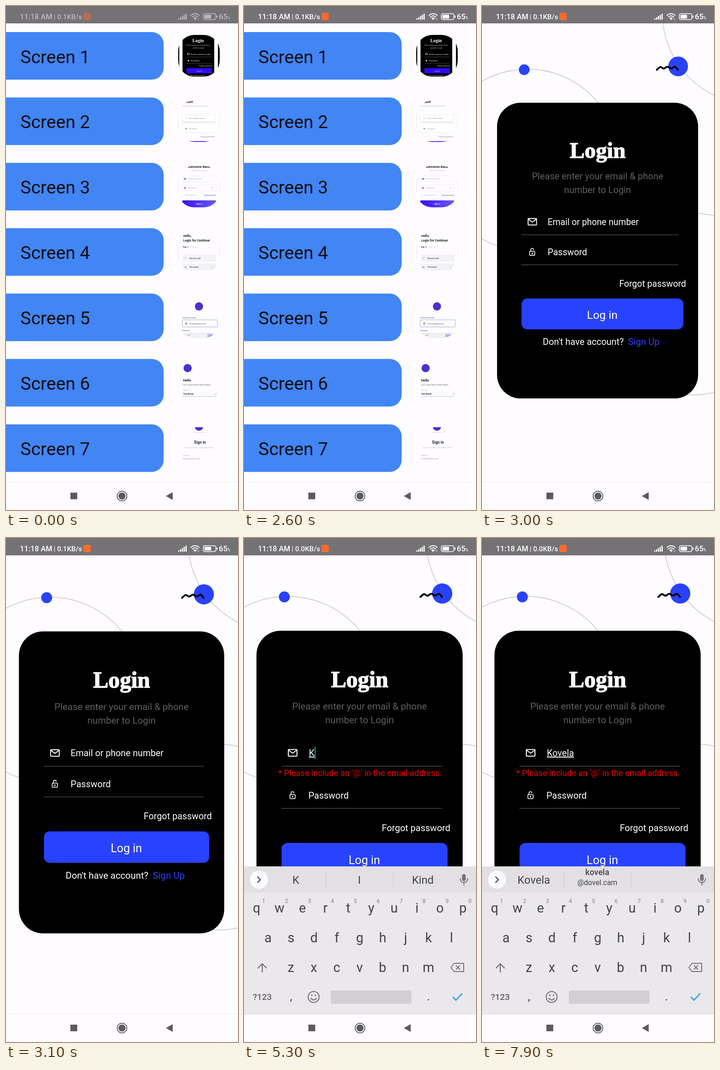
An HTML page that plays this animation: 508 by 1102 pixels, repeating every 8 s.

```html
<!DOCTYPE html>
<html lang="en">
<head>
<meta charset="utf-8">
<title>Login screens</title>
<style>
html, body { margin: 0; width: 100%; height: 100%; overflow: hidden; background: #fefcff; }
svg { display: block; width: 100vw; height: 100vh; font-family: Roboto, sans-serif; }
.mid { text-anchor: middle; }
.end { text-anchor: end; }
.b { font-weight: 700; }
.m { font-weight: 500; }
.serif { font-family: "Liberation Serif", serif; font-weight: 700; }
.line { fill: none; stroke-linecap: round; stroke-linejoin: round; }
</style>
</head>
<body>
<svg id="stage" viewBox="0 0 508 1102" preserveAspectRatio="none"></svg>
<script>
const LOOP = 8000, STEP = 100, MID = [254, 549];
const NAME = 'Kovela', MAIL = '@dovel.cam';

// Shape helpers
const text = (x, y, size, str, fill = '#222', cls = '') =>
  `<text x="${x}" y="${y}" font-size="${size}" fill="${fill}" class="${cls}">${str}</text>`;
const rect = (x, y, w, h, fill, r = 0, more = '') =>
  `<rect x="${x}" y="${y}" width="${w}" height="${h}" rx="${r}" fill="${fill}" ${more}/>`;
const disc = (x, y, r, fill) => `<circle cx="${x}" cy="${y}" r="${r}" fill="${fill}"/>`;
const ring = (x, y, r, stroke, w = 1, more = '') =>
  `<circle cx="${x}" cy="${y}" r="${r}" fill="none" stroke="${stroke}" stroke-width="${w}" ${more}/>`;
const path = (d, stroke, w = 1) => `<path class="line" d="${d}" stroke="${stroke}" stroke-width="${w}"/>`;
const group = (id, body, more = '') => `<g id="${id}" ${more}>${body}</g>`;

// Small round previews, drawn in the place of the first row
const field = (y, h, fill, edge) => rect(386.5, y, 73.5, h, fill, 2, `stroke="${edge}" stroke-width=".7"`);
const edges = rect(377, 92, .8, 34, '#e4e3e6') + rect(467.2, 92, .8, 34, '#e4e3e6');
const previews = [
  rect(376, 63, 3.4, 92, '#000') + rect(464, 63, 5, 92, '#000') + rect(386.5, 63, 69.5, 92, '#000') +
    text(420.5, 79, 10, 'Login', '#fff', 'serif mid') +
    text(421, 87, 3.6, 'Please enter your email &amp; phone', '#ccc', 'mid') +
    text(421, 93, 3.6, 'number to Login', '#ccc', 'mid') +
    rect(397.5, 103.5, 4, 3, 'none', 0, 'stroke="#fff" stroke-width=".7"') +
    text(404.5, 106.5, 4.3, 'Email or phone number', '#fff') + rect(396, 111, 54, .5, '#777') +
    rect(398, 118, 3, 3, '#ccc') + text(404.5, 121, 4.3, 'Password', '#fff') + rect(396, 125, 54, .5, '#777') +
    text(451, 132, 3.8, 'Forgot password', '#ddd', 'end') + rect(395, 136, 55.5, 11, '#3309f5', 1) +
    text(423, 143.5, 4.5, 'Log in', '#b9b0ff', 'mid') +
    text(404, 152.5, 3.6, "Don't have account?", '#ddd') + text(435, 152.5, 3.6, 'Sign Up', '#4030ff'),
  edges + text(381, 69, 7.5, 'Account', '#222', 'b') +
    text(387, 77, 3.4, 'Sign in with your account to continue', '#aaa') +
    rect(385.5, 96.5, 74, 15.5, '#ddd', 4) + rect(385, 95, 74.5, 15.5, '#fff', 4, 'stroke="#e4e4e8" stroke-width=".6"') +
    ring(394.5, 102.5, 1.3, '#aaa', .6) + text(400.5, 104.5, 3.5, 'Email or phone number', '#888') +
    rect(385, 119, 74.5, 15, '#f2f1f5', 4) + rect(385, 118, 74.5, 14.5, '#fff', 4) +
    rect(393, 123.5, 3.5, 3.5, '#aaa') + text(401, 127, 3.8, 'Password', '#888') +
    text(457.5, 144, 4, 'Forgot password?', '#777', 'end') + rect(386, 152.6, 74, 8, '#4419ee', 2),
  edges + text(422.5, 68, 7.4, 'Welcome Back', '#222', 'b mid') +
    text(423, 75, 4.2, 'Sign in to continue', '#aaa', 'mid') +
    field(85.5, 13, '#fefcff', '#eceaf0') + rect(389.5, 90, 5, 4, '#999') + text(398.5, 93.5, 4.2, 'Enter your email', '#aaa') +
    field(105, 13, '#fefcff', '#eceaf0') + rect(390, 110, 4, 4, '#999') + text(398.5, 113.2, 4.2, 'Password', '#aaa') +
    ring(452, 111.5, 1.6, '#bbb', .6) + rect(387, 126, 4, 4, 'none', 0, 'stroke="#ddd" stroke-width=".5"') +
    text(394, 129.5, 3.8, 'Remember me', '#aaa') + text(460, 129.5, 3.4, 'Forgot password?', '#3322dd', 'end') +
    rect(386, 139, 74, 16, 'url(#violet)', 1) + text(423, 148.5, 4.4, 'Sign in', '#fff', 'mid b'),
  edges + text(388, 76.5, 7, 'Hello,', '#222', 'b') + text(388, 86, 7, 'Login for Continue', '#222', 'b') +
    text(387, 99, 4.2, 'Sign in', '#333', 'b') + text(402, 99, 4.2, '/ Sign up', '#bbb') +
    rect(387, 115, 73.5, 15, '#f3f2f4', 2) + ring(393, 122, 1.3, '#999', .6) + text(402, 124.2, 4.4, 'Dorvan Lusk', '#222', 'm') +
    rect(387, 134.5, 73.5, 15, '#f3f2f4', 2) + rect(391.5, 141, 3, 3, '#999') + text(402, 143.5, 4.4, 'Password', '#222', 'm') +
    ring(452, 142, 1.5, '#bbb', .6),
  disc(422.5, 85, 9, '#4a30cf') + text(386, 111, 3.6, 'Username or Email', '#333') +
    rect(386, 114.5, 77, 15.5, '#fff', 2, 'stroke="#8c92e0" stroke-width=".8"') +
    disc(394.5, 121, 1.2, '#666') + rect(392.5, 123, 4, 1.6, '#666', .6) +
    text(402, 124, 3.8, 'fenwotte@dovel.com', '#333') + text(386, 139.5, 3.6, 'Password', '#333') +
    rect(387, 142, 73, 14, '#f0eff2', 2) + text(397, 150.5, 5, '••••', '#333') + rect(441, 145.5, 12, 7, '#b3b2ee', 1),
  disc(397.7, 77, 9, '#4a30cf') + text(387.5, 106.5, 7.6, 'Hello', '#222', 'b') +
    text(387.5, 115.5, 4.5, 'Let’s Learn More About Plants', '#777') + text(387.5, 126, 3, 'Username', '#aaa') +
    text(388, 135, 4.8, 'Tolo Brenk', '#222', 'm') + path('M456.5 133l1.6 1.7 3.4-3.8', '#69c9a2', 1) + rect(387, 138.6, 74, .9, '#a9c6c0'),
  disc(422.5, 62, 9, '#4a30cf') + rect(411, 74.5, 23, .8, '#ccc') + ring(439.5, 73, 2, '#ddd', .8) +
    text(424.5, 99, 8.4, 'Sign in', '#2b2b3b', 'b mid') +
    text(423, 109, 3.9, 'Enter to continue and explore within', '#aaa', 'mid') +
    text(388, 126.5, 3.2, 'Email line', '#999') + text(387, 133.5, 4.1, 'fenwotte@dovel.com', '#888')
];
const rows = previews.map((art, i) => `<g transform="translate(0 ${142.95 * i})">
  ${rect(-40, 57, 385.2, 104, '#4285f5', 26)}${text(31.5, 124.5, 39.4, 'Screen ' + (i + 1), '#0c0d10')}
  <g clip-path="url(#round)">${art}</g></g>`).join('');

// Login page
const lock = `${rect(100.5, 536, 11.5, 9, 'none', 1, 'stroke="#fff" stroke-width="1.6"')}
  ${path('M103 536v-3a3 3 0 0 1 6.3-.6', '#fff', 1.6)}${rect(105.2, 539, 2.4, 3.4, '#fff')}`;
const mail = rect(97, 462.5, 19, 14.5, 'none', 1, 'stroke="#fff" stroke-width="2"') + path('M97.5 464l9 6.5 9-6.5', '#fff', 2);
const login = rect(0, 38, 508, 1002, '#fefcff') +
  ring(95.6, 331.5, 204, '#d3d2d5', 2) + ring(602.5, 1.8, 204, '#d3d2d5', 2) + ring(466, 654.5, 204, '#d3d2d5', 2) +
  disc(88.3, 128.7, 12, '#2942ff') + disc(434, 121.3, 22.1, '#2942ff') +
  path('M386 129L391 124.5Q394 121 398 124.5T406 124Q410 120 414.5 124Q418 128 422.5 124Q427 120 429.5 124L433.5 129', '#000', 4) +
  rect(27.3, 202.8, 451.5, 663.2, '#000', 53) +
  `<g stroke="#fff" stroke-width="1.5">${text(253.3, 326, 50, 'Login', '#fff', 'serif mid')}</g>` +
  text(253, 375, 20.7, 'Please enter your email &amp; phone', '#5f5f5f', 'mid') +
  text(253, 405, 20.7, 'number to Login', '#5f5f5f', 'mid') +
  mail + rect(82, 498.3, 352, 1.2, '#5a5a60') +
  text(141, 477, 19.85, 'Email or phone number', '#fff').replace('<text', '<text id="hint"') +
  '<text id="typed" x="142" y="477" font-size="20" fill="#fff" text-decoration="underline"></text>' +
  '<rect id="caret" y="456.5" width="2.4" height="27" fill="#0d8c82"/>' +
  group('error', text(75, 520, 18.45, "* Please include an '@' in the email address.", '#f50000')) +
  group('lower', lock + text(141, 544.5, 20, 'Password', '#fff') + rect(82, 565.6, 352, 1.2, '#5a5a60') +
    text(451.7, 615.5, 20, 'Forgot password', '#fff', 'end') +
    rect(82.3, 641.8, 363.5, 69.2, '#2942ff', 13) + text(263.5, 687.5, 25.4, 'Log in', '#fff', 'mid') +
    text(130, 746, 20.5, "Don't have account?", '#fff') + text(321.5, 746, 20.8, 'Sign Up', '#2942ff'));

// Keyboard
const INK = '#434246', DIM = '#747276';
const keyRow = (keys, x, y) => [...keys].map((k, i) => text(x + 50.2 * i, y, 29, k, INK, 'mid')).join('');
const letters = f => keyRow(f('qwertyuiop'), 27.5, 819) + keyRow(f('asdfghjkl'), 52.7, 884) + keyRow(f('zxcvbnm'), 102.7, 949);
const shift = color => path('M40 949v-18m-9 9l9-9 9 9', color, 2.4);
const digits = [...'1234567890'].map((d, i) => text(43 + 50.2 * i, 797.5, 13, d, '#858387', 'mid')).join('');
const split = x => rect(x, 731, 1, 31, '#c9c7cb');
const mic = rect(477.5, 735, 8, 15, DIM, 4) + path('M473.5 745c0 11 16 11 16 0M481.5 753v6', DIM, 2);
const face = (x, y, r) => ring(x, y, r, DIM, 2.2) + disc(x - 4, y - 3.5, 1.7, DIM) + disc(x + 4, y - 3.5, 1.7, DIM) +
  path(`M${x - 6} ${y + 3}q6 7 12 0`, DIM, 2.2);
const tools = path('M36 741l-6 6 6 6', INK, 2.4) +
  path('M90 736.5h17a2 2 0 0 1 2 2v10l-7 7h-12a2 2 0 0 1-2-2v-15a2 2 0 0 1 2-2zM93 747q5 6 10 0', DIM, 2.2) +
  disc(94.5, 742, 1.4, DIM) + disc(102.5, 742, 1.4, DIM) +
  `<g letter-spacing="1">${text(172, 751.5, 17.5, 'GIF', DIM, 'b mid')}</g>` +
  ring(245.5, 746, 6.2, DIM, 5) + ring(245.5, 746, 9.8, DIM, 3, 'stroke-dasharray="4.4 3.3"') +
  rect(309, 736, 20, 20, DIM, 2) + split(363) + [401, 409, 417].map(x => disc(x, 746, 2.4, DIM)).join('');
const chips = path('M30 741l6 6-6 6', INK, 2.4) + split(179) + split(326.5) +
  ['wordA', 'wordB', 'wordC'].map((id, i) =>
    `<text id="${id}" x="${[113.5, 252.5, 391.5][i]}" y="756" font-size="24" fill="${INK}" class="mid"></text>`).join('') +
  group('contact', text(252.5, 737, 18, NAME.toLowerCase(), INK, 'm mid') + text(252.5, 759, 16, MAIL, INK, 'mid'));
const keyboard = rect(0, 718, 508, 324, '#eae8eb') + rect(0, 718, 508, 57, '#e2e0e3') + disc(33, 747, 19.7, '#fbfafc') + mic +
  group('tools', tools) + group('chips', chips) + digits +
  group('upper', letters(s => s.toUpperCase()) + shift('#2f9ee8')) + group('small', letters(s => s) + shift(DIM)) +
  path('M460 930h21v18h-21l-7-9zM464.5 935l8 8m0-8l-8 8', DIM, 2) +
  text(40, 1010, 19, '?123', '#5f5d61', 'm mid') + text(103, 1011, 26, ',', INK, 'mid') + face(152.5, 1003.5, 12) +
  rect(190, 989, 177, 29.5, '#d2d0d3', 4) + text(404, 1011, 26, '.', INK, 'mid') + path('M458 1004l6 6.5 13-14', '#2f9ee8', 2.6);

// System bars
const bars = [0, 1, 2, 3, 4].map(i => rect(377 + 4 * i, 27 - 2.6 * i, 2.6, 3 + 2.6 * i, '#fff', 1)).join('');
const wifi = path('M405 20.5q9-7.5 18 0M408 24q6-5 12 0', '#fff', 2) + `<path d="M410 26.5q4-3 8 0l-4 4z" fill="#fff"/>` +
  path('M420 27v3.5M422.5 27v3.5', '#d5d4d6', .9);
const status = text(30.5, 29, 16.4, '11:18 AM', '#fff', 'm') + text(104.5, 28.5, 15, '|', '#fff') +
  '<text id="speed" x="112" y="29" font-size="15.2" fill="#fff" class="m"></text>' +
  rect(169.5, 15, 16, 16, '#fb6a2c', 3.5) + bars + wifi +
  rect(432, 16.8, 27.5, 13, 'none', 3.5, 'stroke="#fff" stroke-width="1.6"') + rect(434.5, 19.2, 14.5, 8.2, '#fff', 1) +
  rect(461, 20.5, 2, 5.5, '#fff', 1) + text(466, 29, 16.6, '65', '#fff', 'm') + text(484.5, 29, 9, '%', '#fff', 'm');
const buttons = rect(141, 1064, 15, 14.5, '#5c5a5e') + ring(254, 1071.5, 10.7, '#5c5a5e', 1.7) + disc(254, 1071.5, 7.8, '#5c5a5e') +
  '<path d="M350 1071.5l15-8.5v17z" fill="#5c5a5e"/>';

document.getElementById('stage').innerHTML = `<defs>
  <clipPath id="round"><rect x="377" y="63.3" width="91" height="91" rx="35"/></clipPath>
  <linearGradient id="violet"><stop stop-color="#3a10f0"/><stop offset="1" stop-color="#6a5cfb"/></linearGradient></defs>` +
  rect(0, 0, 508, 1102, '#fefcff') + group('list', rows) + group('login', login) +
  group('cover', rect(0, 718, 508, 322, '#faf8fb')) +
  rect(0, 1040, 508, 62, '#fefcff') + rect(0, 1040, 508, 1, '#efedf0') +
  group('keyboard', keyboard) + buttons + rect(0, 0, 508, 38, '#757276') + group('status', status);

// Motion tables: [time, value]
const glow = [[200, .5], [400, 1]];
const leave = [[2800, 1], [2900, 1.0226]];
const enter = [[3000, .975], [3100, .9956], [3200, 1]];
const slide = [[4000, 384], [4100, 190], [4200, 58], [4300, 0]];
const strokes = [5100, 5600, 5800, 6000, 6200, 6400];
const FOCUS = 4000;

function at(table, t) {
  const n = table.findIndex(p => p[0] >= t);
  if (n < 0) return table[table.length - 1][1];
  if (n === 0) return table[0][1];
  const [[t0, a], [t1, b]] = [table[n - 1], table[n]];
  return a + (b - a) * (t - t0) / (t1 - t0);
}
const el = id => document.getElementById(id);
const show = (id, on) => { el(id).style.display = on ? '' : 'none'; };
const move = (id, value) => el(id).setAttribute('transform', value);
const zoom = (id, s) => move(id, `translate(${MID}) scale(${s}) translate(${MID.map(v => -v)})`);

function draw(now) {
  const t = Math.floor(now % LOOP / STEP) * STEP;
  const count = strokes.filter(s => s <= t).length;
  const typed = NAME.slice(0, count), full = count === NAME.length;

  el('status').style.opacity = at(glow, t);
  el('speed').textContent = (t < 3900 ? '0.1' : '0.0') + 'KB/s';
  show('list', t < 3000);
  el('list').style.opacity = t < 2900 ? 1 : .97;
  zoom('list', at(leave, t));
  show('login', t >= 3000);
  zoom('login', at(enter, t));

  show('cover', t > FOCUS);
  show('keyboard', t > FOCUS);
  move('keyboard', `translate(0 ${at(slide, t)})`);
  for (const id of ['tools', 'upper', 'hint']) show(id, !count);
  for (const id of ['chips', 'small', 'error']) show(id, count);
  move('lower', `translate(0 ${count ? 25 : 0})`);

  el('typed').textContent = typed;
  const last = count ? strokes[count - 1] : FOCUS;
  show('caret', t >= FOCUS && (t - last) % 1000 < 500);
  el('caret').setAttribute('x', 142 + (count ? el('typed').getComputedTextLength() : 0));
  el('wordA').textContent = typed;
  el('wordB').textContent = count === 1 ? 'I' : '';
  el('wordC').textContent = count === 1 ? 'Kind' : '';
  show('contact', full);
}
const start = performance.now();
function tick() {
  draw(performance.now() - start);
  requestAnimationFrame(tick);
}
tick();
</script>
</body>
</html>
```
